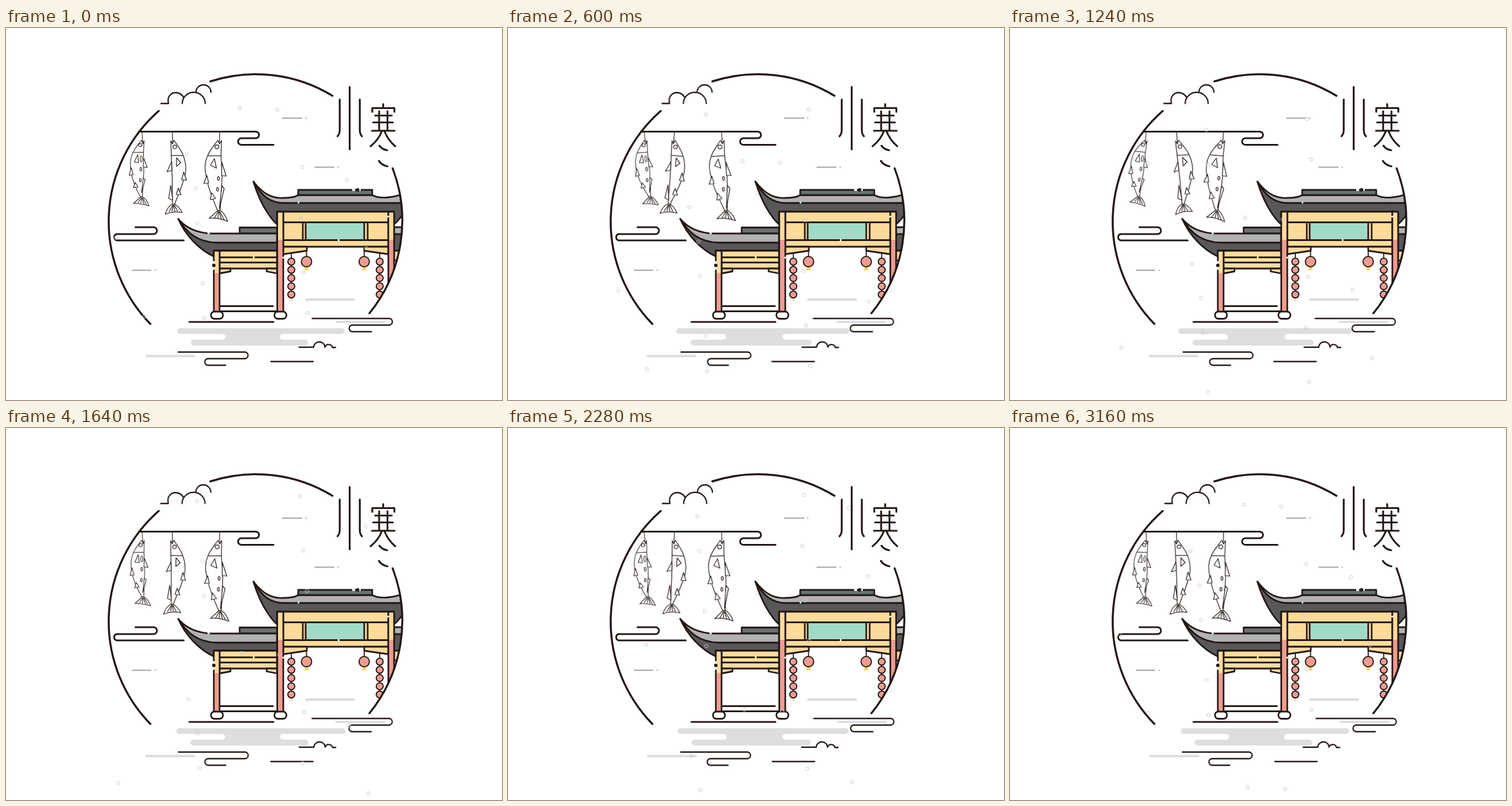
Animation, 864 px wide and 648 px high, one loop 3.2 s. Source, as an HTML page without scripts:

```html
<!DOCTYPE html>
<html lang="zh">
<head>
<meta charset="utf-8">
<title>小寒</title>
<style>
  html, body { margin: 0; width: 100%; height: 100%; overflow: hidden; background: #fff; }
  svg { display: block; width: 864px; height: 648px; }
  .ink { fill: none; stroke: #231815; stroke-width: 3; stroke-linecap: round; stroke-linejoin: round; }
  .thin { stroke-width: 2.3; }
  .hair { stroke-width: 1.25; }
  .far { stroke-width: 1.05; }
  .white { fill: #fff; }
  .gold { fill: #fedb9a; }
  .red { fill: #ee9c90; }
  .teal { fill: #a2dac8; }
  .slate { fill: #58585a; }
  .tile { fill: #b2b2b3; }
  .ridge { fill: #68726f; }
  .dot { fill: #231815; stroke: none; }
  .bare { stroke: none; }
  .gap { fill: none; stroke-width: 3.6; }
  .mist { fill: none; stroke: #dcdcdd; stroke-width: 4; stroke-linecap: round; }
  .wind { fill: none; stroke: #b5b0b0; stroke-width: 2.4; stroke-linecap: round; }

  .fish { animation: swing 1.6s infinite; }
  .drift { animation: drift 1.6s infinite; }
  .breathe { transform-origin: 444px 538px; animation: breathe 1.6s infinite; }
  .left { --d: -2.3px; }
  .right { --d: 2.3px; }
  .flakes { fill: none; stroke: #cbcacb; stroke-width: 1; animation: fall 6.4s linear infinite; }
  .flakes.low { animation-delay: -3.2s; }

  @keyframes swing {
    0%, 50% { transform: rotate(0deg); animation-timing-function: cubic-bezier(.39,.575,.565,1); }
    25% { transform: rotate(var(--a)); animation-timing-function: cubic-bezier(.47,0,.745,.715); }
    75% { transform: rotate(var(--b)); animation-timing-function: cubic-bezier(.47,0,.745,.715); }
    100% { transform: rotate(0deg); }
  }
  @keyframes drift {
    0%, 50% { transform: translateX(0); animation-timing-function: cubic-bezier(.39,.575,.565,1); }
    25% { transform: translateX(var(--d)); animation-timing-function: cubic-bezier(.47,0,.745,.715); }
    75% { transform: translateX(calc(var(--d) * .8)); animation-timing-function: cubic-bezier(.47,0,.745,.715); }
    100% { transform: translateX(0); }
  }
  @keyframes breathe {
    0%, 50% { transform: scaleX(1); animation-timing-function: cubic-bezier(.39,.575,.565,1); }
    25% { transform: scaleX(1.047); animation-timing-function: cubic-bezier(.47,0,.745,.715); }
    75% { transform: scaleX(1.037); animation-timing-function: cubic-bezier(.47,0,.745,.715); }
    100% { transform: scaleX(1); }
  }
  /* two loops from sky to ground, slower in the upper half */
  @keyframes fall {
    0% { transform: translate(-1.2px, -436px); }
    50% { transform: translate(0, 0); }
    100% { transform: translate(7px, 493px); }
  }
</style>
</head>
<body>
<svg viewBox="0 0 864 648" role="img" aria-label="小寒">
  <defs>
    <clipPath id="disc"><circle cx="435" cy="336.5" r="256"/></clipPath>
    <clipPath id="sky"><circle cx="435" cy="336.5" r="256"/><rect y="336" width="864" height="312"/></clipPath>
    <g id="beads">
      <path class="ink" stroke-width="2" style="stroke-width:1.8" d="M0 393V470"/>
      <rect class="gold" x="-1.5" y="470" width="3" height="6"/>
      <g class="ink red" style="stroke-width:2;fill:#ee9c90">
        <circle cy="407" r="6"/><circle cy="421.3" r="6"/><circle cy="435.6" r="6"/><circle cy="449.9" r="6"/><circle cy="464.2" r="6"/>
      </g>
    </g>
    <g id="lantern">
      <path class="ink" style="stroke-width:1.8" d="M0 388V398"/>
      <path style="fill:#fbd766" d="M-3.5 416h7v6h-7z"/>
      <circle class="ink" style="stroke-width:2;fill:#ee9c90" cy="407" r="9"/>
    </g>
    <g id="flakes">
      <circle cx="407" cy="139" r="3"/><circle cx="472.5" cy="142" r="3"/><circle cx="516" cy="242" r="3"/>
      <circle cx="594" cy="265" r="3"/><circle cx="314.3" cy="220" r="3"/><circle cx="330.3" cy="279.3" r="3"/>
      <circle cx="333.3" cy="339.5" r="3"/><circle cx="513" cy="331" r="3"/><circle cx="342.7" cy="444.3" r="3"/>
      <circle cx="518" cy="425.5" r="3"/><circle cx="525" cy="496" r="3"/><circle cx="345.7" cy="505" r="3"/>
      <circle cx="241" cy="502" r="3"/><circle cx="627.3" cy="383.5" r="3"/><circle cx="191.3" cy="365.5" r="3"/>
    </g>
  </defs>

  <!-- mist and wind -->
  <path class="wind" d="M482 157H515M522 157h.1M538.5 242.5H571M578.5 242.5h.1M220.500 422H252M260 422h.1"/>
  <path class="mist" d="M523 473H606"/>
  <path class="mist drift left" style="stroke:#dedee6" d="M576 512H659"/>
  <path class="mist drift left" d="M245 571.500H328"/>
  <path class="breathe" fill="#dededf" d="M303 523H585a5 5 0 0 1 0 10H482a5 5 0 0 0 0 10H521a5 5 0 0 1 0 10H327a5 5 0 0 1 0-10H377a5 5 0 0 0 0-10H303a5 5 0 0 1 0-10z"/>

  <!-- gate -->
  <g clip-path="url(#disc)">
    <g class="ink" style="stroke-width:2.8">
      <!-- right wing -->
      <path class="tile" d="M676 347H700V373H676z"/>
      <path class="slate" d="M676 359H700V388H676z"/>
      <path class="gold" d="M676 388H700V405H676z"/>

      <!-- lower roof -->
      <path class="ridge" d="M407 347.500H472V358H407z"/>
      <path class="tile" d="M300 332.500C314 349 332 357 358 358H472V374H366C335 373 315 358 300 332.500z"/>
      <path class="slate" d="M300 332.500C315 358 335 373 366 374H472V387.500H362V398C335 385 312 360 300 332.500z"/>

      <!-- lower frame -->
      <path class="gold" d="M372 388H472V419H372z"/>
      <path d="M372 399.500H472M372 408.500H472"/>
      <path class="gold" d="M372 419H391V424L372 427.500zM472 419H454V424L472 427.500z"/>
      <path class="gold bare" d="M362 388H372V427H362z"/>
      <path class="red bare" d="M362 427H372V493H362z"/>
      <path d="M362 388V493M372 388V493M362 388H372"/>
      <path d="M374 484.500H465M372 493.500H472"/>

      <!-- upper roof -->
      <path class="tile" d="M431 267.500C447 288 462 297 482 296C493 296 503 295 509 291H638C650 298 674 297 700 286V305H482C460 304 445 293 431 267.500z"/>
      <path class="ridge" d="M509 282H638V291H509z"/>
      <path class="slate" d="M431 267.500C445 293 460 304 482 305H700V310Q688 332 676 342V320H472V342C455 326 440 298 431 267.500z"/>

      <!-- upper frame -->
      <path class="gold" d="M483 320H666V338.500H483zM483 338.500H666V369.500H483zM483 369.500H666V381H483z"/>
      <path class="teal" d="M522 338.500H624V369.500H522z"/>
      <path d="M517 338.500V369.500M630 338.500V369.500"/>
      <path class="gold" d="M483 381H524V388L483 394zM666 381H624V388L666 394z"/>
      <path class="gold bare" d="M472.500 320H483V369H472.500zM666 320H676V369H666z"/>
      <path class="red bare" d="M472.500 369H483V493H472.500zM666 369H676V460H666z"/>
      <path d="M472.500 320V493M483 320V493M666 320V460M676 320V460M472.500 320H483M666 320H676"/>
    </g>

    <!-- breaks in the lines -->
    <path class="gap" stroke="#fff" d="M603 282H608M615 282H618M351 357H355"/>
    <path class="gap" stroke="#d8d8d8" d="M508 304H511"/>
    <path class="gap" stroke="#fff0d2" d="M430 399.500H433M578 369.500H581M666 327V330M483 398.500V401.500"/>
    <path class="gap" stroke="#fff" d="M362 406V421"/>
    <circle class="dot" cx="612.500" cy="282" r="3"/>
    <circle class="dot" cx="362" cy="413.500" r="3"/>

    <use href="#lantern" x="523.5"/>
    <use href="#lantern" x="624"/>
    <use href="#beads" x="497"/>
    <use href="#beads" x="651"/>
  </g>
  <g class="ink" style="stroke-width:2.8">
    <rect class="white" x="357" y="494" width="21" height="12.500" rx="6"/>
    <rect class="white" x="467.500" y="494" width="21" height="12.500" rx="6"/>
  </g>
  <path class="ink" d="M319.500 512H466"/>

  <!-- moon ring -->
  <path class="ink" style="stroke-width:3.5" d="M266 144.500A256 256 0 0 0 251.500 515.500M356 93A256 256 0 0 1 568.500 118M673.500 244.500A256 256 0 0 1 633 497"/>

  <!-- clouds -->
  <path class="ink thin drift left" d="M270 131.500H283C280 119 288 112.500 296 112.500Q305 113 309.500 121M307 131.500a20 19.500 0 0 1 40 0M331 112a13 13 0 0 1 26 0"/>
  <path class="ink" d="M225.500 347H257a6 6 0 0 1 0 12H193a5.600 5.600 0 0 0 0 11H309.500"/>
  <path class="ink thin drift left" d="M533.500 506H668a5.800 5.800 0 0 1 0 11.500H603.500a5.700 5.700 0 0 0 0 11.500H636.500"/>
  <path class="ink thin drift right" style="--d:2px" d="M300 564.500H416.500a5.800 5.800 0 0 1 0 11.500H352a5.700 5.700 0 0 0 0 11.500H382.500"/>
  <path class="ink thin drift right" d="M510.500 556H536a9.500 9 0 0 1 19.500 0a6.700 6.500 0 0 1 13 .5H574"/>
  <path class="ink thin drift left" d="M461.500 581H535"/>

  <!-- fish -->
  <g class="fish" style="--a:-8.1deg;--b:6.1deg;transform-origin:237px 181px">
    <g class="ink far">
      <path d="M237 181L238 200"/>
      <path class="white" d="M236 195.500L238.500 202L240.500 196L239.500 218L240 250L237.500 294H234C222 272 214 248 217.500 228C220 214 228 206 236 195.500z"/>
      <path d="M221.500 216.500H239.500"/>
      <circle cx="234" cy="204" r="2.800"/>
      <path class="white" d="M240 227L246 243L239 242zM218 243L214.500 256.500L221.500 255.500zM225 269L222 278L230 277zM239 262L242.500 264L236 287z"/>
      <path d="M229.500 220.500L223.500 233.500L231 234.500z"/>
      <ellipse cx="235.500" cy="228" rx="1.800" ry="5"/><ellipse cx="235" cy="246" rx="1.600" ry="3.200"/><ellipse cx="234" cy="265" rx="1.500" ry="3"/>
      <path class="white" d="M235 294L222 305.500Q234 305 249 310Q246 300 238 294z"/>
      <path d="M235.500 296L230 304M236 296L235 305M237 296L240 306M238 296L244 307"/>
    </g>
  </g>
  <g class="fish" style="--a:7.200deg;--b:-4.450deg;transform-origin:290px 181px">
    <g class="ink hair">
      <path d="M290 181V200"/>
      <path class="white" d="M287 196.500L290 202L292.500 195.500C299 205 306 213 309.500 224C315 240 313.500 255 309 266C304 284 298 294 294 307H290L289.500 260L288 222z"/>
      <path d="M288 222H308.500"/>
      <circle cx="294" cy="207" r="3.200"/>
      <path class="white" d="M288.500 233L280.500 250.500L289 248zM309.500 251L314.500 265L306 264.500zM300 279L305 290.500L296.500 290zM287 274L283.500 297L290.500 300z"/>
      <path d="M297 226L304.500 234.500L297 241z"/>
      <path class="white" d="M290 307Q281 311 277.500 324.500Q292 318 307 321.500Q303 313 294 307z"/>
      <path d="M290.500 309L284 320M291.500 309L289 319M292.500 309L294 319M293.500 309L299 319"/>
    </g>
  </g>
  <g class="fish" style="--a:-5.400deg;--b:4.500deg;transform-origin:372px 181px">
    <g class="ink hair">
      <path d="M372 181V200"/>
      <path class="white" d="M369 195.500L372 202L375.500 196L374.500 222L376.500 260L373 318H368.500C362 302 352 280 349 260C346 248 346 234 350.500 224C355 212 362 206 369 195.500z"/>
      <path d="M352 222.500H374.500"/>
      <circle cx="367.500" cy="207" r="3.400"/>
      <path class="white" d="M376 234L383.500 258L375.500 257zM350 257L344.500 270.500L353 270zM358 287L356 299L365 297zM376 275L380 280L371.500 315z"/>
      <path d="M363 227.500L356 239L366.500 244z"/>
      <ellipse cx="370" cy="262" rx="1.700" ry="3.200"/><ellipse cx="368.500" cy="281" rx="1.700" ry="3.200"/>
      <path class="white" d="M369 318L354 331.500Q370 330 386 337Q382 324 373.500 318z"/>
      <path d="M369.500 320L363 331M370.500 320L369 331M371.500 320L375 333M372.500 320L380 334"/>
    </g>
  </g>
  <path class="ink" d="M231.500 180.500H435a5.700 5.700 0 0 1 0 11.500H410a5.700 5.700 0 0 0 0 11.500H466"/>

  <!-- lettering -->
  <g class="ink" style="stroke-width:3.200">
    <path d="M598.700 102.500V211.500M581.300 124.500V178Q581 185 577.500 188.500M616.300 124.500V178Q616.500 185 620 188.500"/>
    <path d="M657 132.500V138M638 146V139.500H676.500V146M643 152.500H672M639.500 164.500H674M637.500 179H677M650 145V179M664.500 145V179"/>
    <path d="M655 179Q649 195 635 206M659 179Q665 195 678 206M650.500 205Q655 211.500 664 213M649.500 231.500Q655 239.500 664.500 241"/>
  </g>

  <!-- snow -->
  <g clip-path="url(#sky)">
    <g class="flakes low"><use href="#flakes"/></g>
    <g class="flakes"><use href="#flakes"/></g>
  </g>
</svg>
</body>
</html>
```
